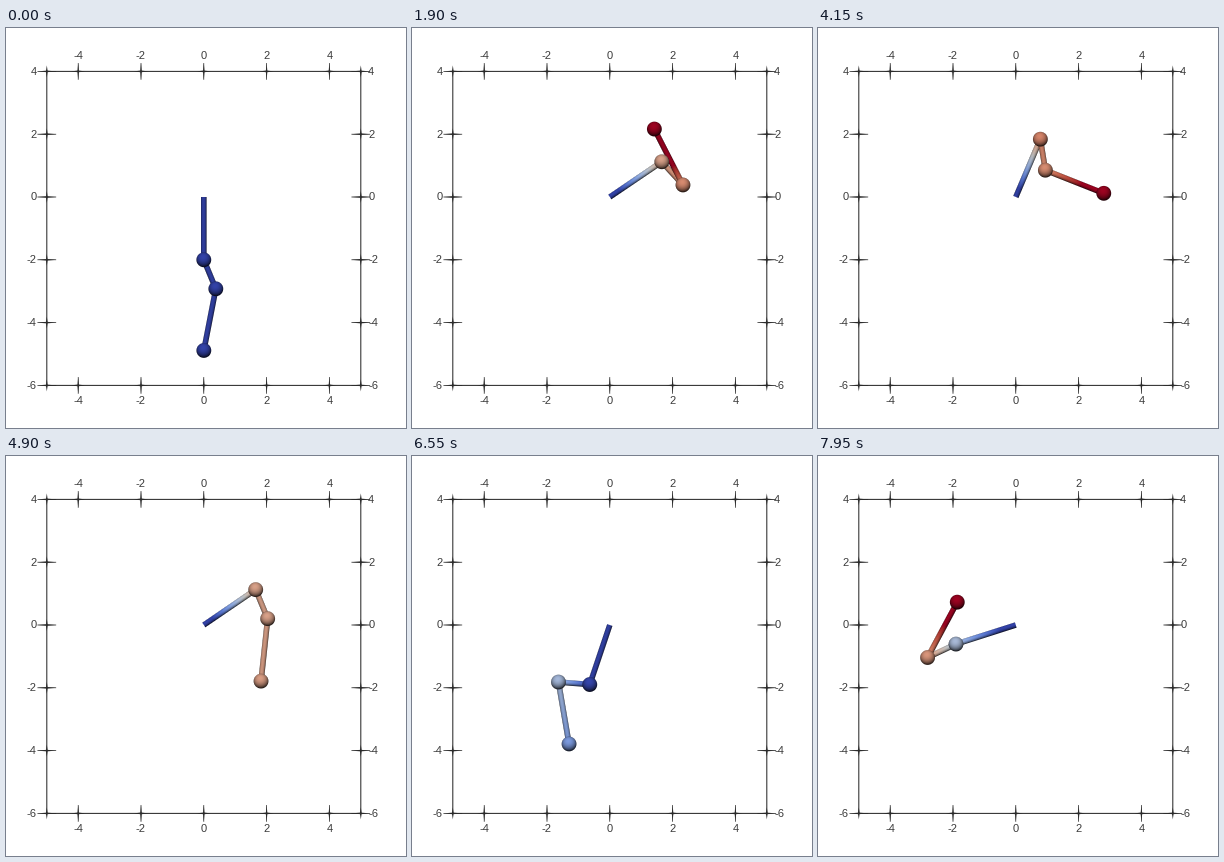
Animation, 400 px wide and 400 px high, one loop 8000 ms. Source, as a matplotlib script:

```python
import numpy as np
import matplotlib.pyplot as plt
from matplotlib.animation import FuncAnimation

SIZE, N, DT = 400, 160, 0.05
UNIT = 31.4
ORIGIN = np.array([197.8, 169.0])
LENGTHS = np.array([2.0, 1.0, 2.0])
MASS_BELOW = np.array([3.0, 2.0, 1.0])
BALL, ROD = 7.4, 2.8
SHIFT_RANGE = (0.6, 5.0)
INK = "#2b2b2b"

# Known poses: step -> link angles in degrees, counted from straight down.
POSES = {
    0: (0, 22.5, -11),
    19: (68.5, 97, -87.3),
    58: (152.2, 21.1, -211.3),
    83: (157, 9.2, -291.6),
    112: (42, 81.9, -410.2),
    131: (-18.6, -94.5, -350.3),
    159: (-72.3, -64.7, -568.2),
}
# Rough poses that only shape the first guess.
HINTS = {
    38: (118, 98, -152),
    98: (110, 45, -347),
    141: (-42, -155, -412),
    152: (-62, -82, -525),
}


def smooth_path(poses):
    """Natural cubic curve through the poses, one column per link."""
    bend = np.diff(np.eye(N), 2, axis=0)
    system = bend.T @ bend
    target = np.zeros((N, 3))
    for step, angles in poses.items():
        system[step, step] += 1.0
        target[step] = np.radians(angles)
    return np.linalg.solve(system, target)


INERTIA = (MASS_BELOW[np.maximum.outer(range(3), range(3))]
           * np.outer(LENGTHS, LENGTHS))
WEIGHT = MASS_BELOW * LENGTHS


def motion_error(q, g):
    """How far a path is from the equations of a triple pendulum."""
    vel = (q[2:] - q[:-2]) / (2 * DT)
    acc = (q[2:] - 2 * q[1:-1] + q[:-2]) / DT ** 2
    mid = q[1:-1]
    gap = mid[:, :, None] - mid[:, None, :]
    pull = np.cos(gap) * acc[:, None, :] + np.sin(gap) * vel[:, None, :] ** 2
    return (INERTIA * pull).sum(2) + g * WEIGHT * np.sin(mid)


def solve_path(pin=1500.0, rounds=140):
    """Pendulum motion through the known poses (damped least squares)."""
    steps = np.array(list(POSES))
    goal = np.radians(list(POSES.values()))
    z = np.append(smooth_path({**POSES, **HINTS}).ravel(), 1.5)
    rows = 3 * (N - 2)
    inner = np.arange(N - 2)

    def errors(z):
        q = z[:-1].reshape(N, 3)
        return np.append(motion_error(q, z[-1]).ravel(),
                         pin * (q[steps] - goal).ravel())

    def jacobian(z, base, h=1e-6):
        jac = np.zeros((len(base), len(z)))
        # Three neighbouring steps interact, so nine groups cover everything.
        for group in range(9):
            moved = z.copy()
            moved[:-1][group::9] += h
            diff = ((errors(moved) - base)[:rows] / h).reshape(-1, 3)
            col = 3 * (inner + (group // 3 - inner) % 3) + group % 3
            for k in range(3):
                jac[3 * inner + k, col] = diff[:, k]
        moved = z.copy()
        moved[-1] += h
        jac[:, -1] = (errors(moved) - base) / h
        jac[rows:, -1] = 0
        cols = (3 * steps[:, None] + np.arange(3)).ravel()
        jac[rows + np.arange(len(cols)), cols] = pin
        return jac

    err = errors(z)
    jac = jacobian(z, err)
    damp = 10.0
    for _ in range(rounds):
        step = np.linalg.solve(jac.T @ jac + damp * np.eye(len(z)),
                               -jac.T @ err)
        trial = errors(z + step)
        if trial @ trial < err @ err:
            done = trial @ trial > 0.99999 * (err @ err)
            z, err, damp = z + step, trial, max(damp * 0.3, 1e-4)
            if done:
                break
            jac = jacobian(z, err)
        else:
            damp *= 4
            if damp > 1e12:
                break
    return z[:-1].reshape(N, 3)


path = solve_path()
links = np.stack([np.sin(path), -np.cos(path)], axis=2) * LENGTHS[:, None]
joints = np.concatenate([np.zeros((N, 1, 2)), links.cumsum(axis=1)], axis=1)
shift = np.linalg.norm(joints - joints[0], axis=2)
screen = ORIGIN + joints * UNIT * np.array([1, -1])

cmap = plt.get_cmap("coolwarm")
Y, X = np.mgrid[0:SIZE, 0:SIZE] + 0.5


def window(p, q, pad):
    lo = np.maximum(np.minimum(p, q).astype(int) - pad, 0)
    hi = np.maximum(p, q).astype(int) + pad + 1
    return np.s_[lo[1]:hi[1], lo[0]:hi[0]]


def blend(img, win, values, light, cover):
    low, high = SHIFT_RANGE
    tone = np.clip((values - low) / (high - low), 0, 1)
    rgb = cmap(tone)[..., :3] * light[..., None]
    img[win] += cover[..., None] * (rgb - img[win])


def lit(nx, ny, nz):
    return 0.18 + 0.7 * np.clip(-0.1 * nx - 0.42 * ny + 0.9 * nz, 0, 1)


def draw_rod(img, p, q, a, b):
    win = window(p, q, 5)
    length = np.hypot(*(q - p))
    ux, uy = (q - p) / length
    dx, dy = X[win] - p[0], Y[win] - p[1]
    along = dx * ux + dy * uy
    side = (dy * ux - dx * uy) / ROD
    up = np.sqrt(np.clip(1 - side ** 2, 0, 1))
    cover = (np.clip(ROD * (1 - abs(side)) + 0.5, 0, 1)
             * np.clip(along + 0.5, 0, 1)
             * np.clip(length - along + 0.5, 0, 1))
    values = a + (b - a) * np.clip(along / length, 0, 1)
    blend(img, win, values, lit(-uy * side, ux * side, up), cover)


def draw_ball(img, c, value):
    win = window(c, c, 9)
    dx, dy = (X[win] - c[0]) / BALL, (Y[win] - c[1]) / BALL
    r = np.hypot(dx, dy)
    up = np.sqrt(np.clip(1 - r ** 2, 0, 1))
    cover = np.clip((1 - r) * BALL + 0.5, 0, 1)
    blend(img, win, np.full_like(r, value), lit(dx, dy, up), cover)


def render(i):
    img = np.ones((SIZE, SIZE, 3))
    for k in range(3):
        draw_rod(img, screen[i, k], screen[i, k + 1],
                 shift[i, k], shift[i, k + 1])
    for k in range(1, 4):
        draw_ball(img, screen[i, k], shift[i, k])
    return img


fig = plt.figure(figsize=(4, 4), dpi=100, facecolor="white")
ax = fig.add_axes([0, 0, 1, 1])
picture = ax.imshow(render(0), extent=(0, SIZE, SIZE, 0), aspect="auto",
                    interpolation="nearest", zorder=0)
ax.set_xlim(0, SIZE)
ax.set_ylim(SIZE, 0)
ax.axis("off")


def line(xs, ys, width):
    ax.plot(xs, ys, color=INK, lw=width, snap=False, zorder=2)


def spike(x, y, rx, ry):
    ax.fill([x - rx, x, x + rx, x], [y, y - ry, y, y + ry],
            color=INK, lw=0, zorder=3)


def label(x, y, value, align):
    ax.text(x, y, str(value), ha=align, va="center_baseline", fontsize=8,
            family="Liberation Sans", color="#3c3c3c", zorder=4)


LEFT, RIGHT = ORIGIN[0] - 5 * UNIT, ORIGIN[0] + 5 * UNIT
TOP, BOTTOM = ORIGIN[1] - 4 * UNIT, ORIGIN[1] + 6 * UNIT
line([LEFT, RIGHT, RIGHT, LEFT, LEFT], [TOP, TOP, BOTTOM, BOTTOM, TOP], 0.75)

for value in range(-4, 5, 2):
    x = ORIGIN[0] + value * UNIT
    for y, text_y in ((TOP, 27), (BOTTOM, 372)):
        line([x, x], [y - 8, y + 8], 0.5)
        spike(x, y, 0.8, 8.5)
        spike(x, y, 7, 0.9)
        label(x, text_y, value, "center")

for value in range(-6, 5, 2):
    y = ORIGIN[1] - value * UNIT
    for x, text_x, align in ((LEFT, 30.8, "right"), (RIGHT, 362.2, "left")):
        line([x - 9, x + 9], [y, y], 0.5)
        spike(x, y, 9.5, 0.8)
        spike(x, y, 0.9, 6)
        label(text_x, y - 0.5, value, align)


def update(i):
    picture.set_data(render(i))
    return [picture]


anim = FuncAnimation(fig, update, frames=N, interval=50, repeat=True,
                     repeat_delay=0, blit=False)
plt.show()
```
